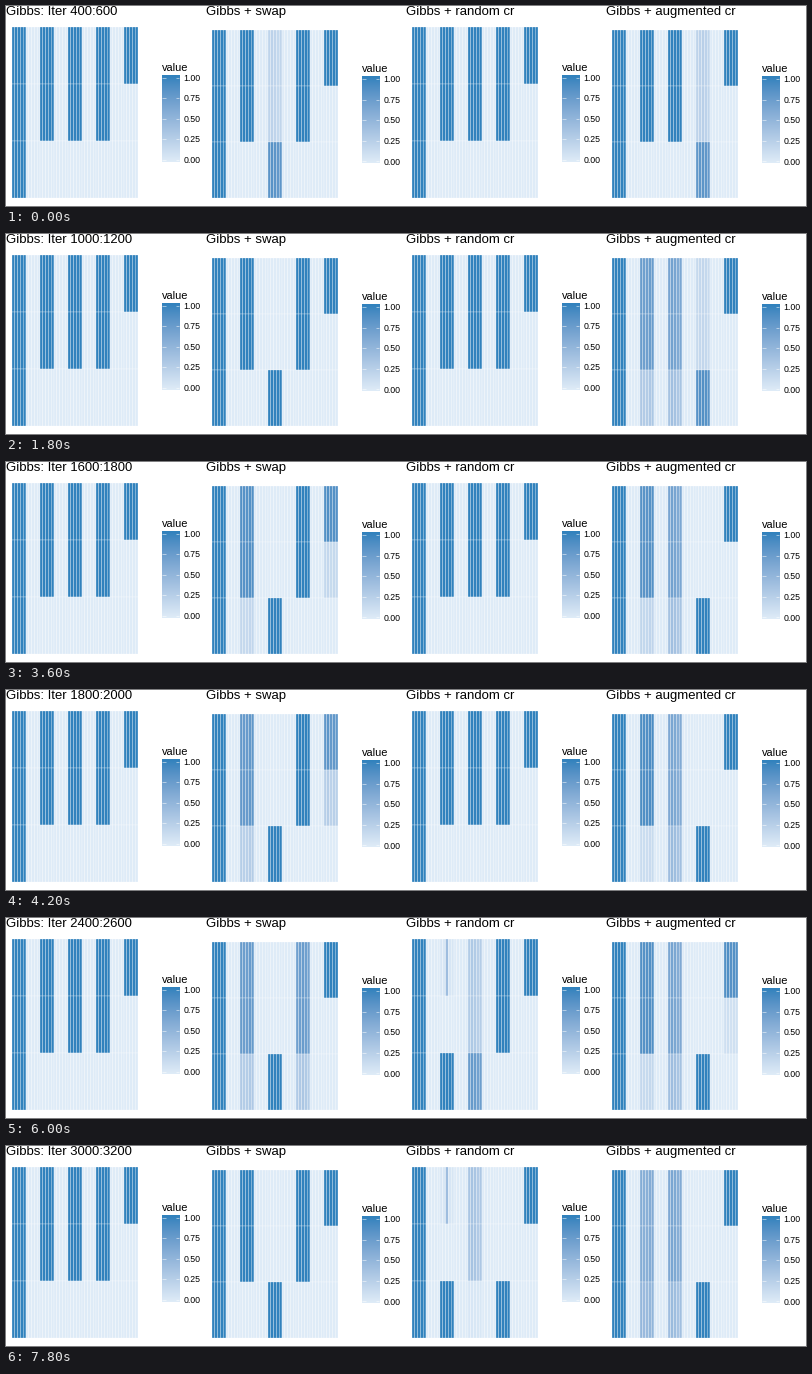
A matplotlib script for the animation above (8000 ms loop, 800 by 200 pixels).

```python
import numpy as np
import matplotlib.pyplot as plt
from matplotlib.animation import FuncAnimation
from matplotlib.colors import ListedColormap

W, H = 800, 200
STEP_FRAMES, FRAMES, INTERVAL = 3, 40, 200
GROUPS, PER_GROUP, ROWS = 9, 5, 3
LEFT, PANEL_W, BOTTOM = 6, 126, 192

plt.rcParams["font.family"] = "Liberation Sans"

# --- colour scale, blended in Lab space ---
TO_XYZ = np.array([[.4124, .3576, .1805], [.2126, .7152, .0722], [.0193, .1192, .9505]])
WHITE = TO_XYZ.sum(axis=1)


def rgb_to_lab(hex_code):
    rgb = np.array([int(hex_code[i:i + 2], 16) for i in (1, 3, 5)]) / 255
    linear = ((rgb + .055) / 1.055) ** 2.4
    x, y, z = np.cbrt(TO_XYZ @ linear / WHITE)
    return np.array([116 * y - 16, 500 * (x - y), 200 * (y - z)])


def lab_to_rgb(lab):
    y = (lab[0] + 16) / 116
    xyz = np.array([y + lab[1] / 500, y, y - lab[2] / 200]) ** 3 * WHITE
    linear = np.clip(np.linalg.solve(TO_XYZ, xyz), 0, 1)
    return np.clip(1.055 * linear ** (1 / 2.4) - .055, 0, 1)


LOW, HIGH = rgb_to_lab("#DEEBF7"), rgb_to_lab("#3182BD")
BLUES = ListedColormap([lab_to_rgb(LOW + t * (HIGH - LOW)) for t in np.linspace(0, 1, 256)])

# --- block values: step -> {group: (top, middle, bottom)} ---
BASE = {0: (1, 1, 1), 2: (1, 1, 0), 4: (1, 1, 0), 6: (1, 1, 0), 8: (1, 0, 0)}


def split(p):
    """Block that is in the upper rows for a share p of the draws."""
    return (p, p, 1 - p)


SETTLED = {4: split(0)}
SWAP = {
    0: {4: split(.2)},
    1: SETTLED,
    4: SETTLED,
    7: {2: split(.75), 4: split(0), 8: (.78, .25, 0)},
    10: {2: split(.72), 4: split(0), 6: split(.7)},
    12: {2: split(.83), 4: split(0), 6: split(.84), 8: (.83, .2, 0)},
    13: SETTLED,
}
RANDOM = {
    0: {},
    7: {},
    10: {2: (.04, 0, 1), 4: split(.28)},
    12: {2: (.04, 0, 1), 4: split(.25), 6: split(.55)},
    13: {2: (.04, 0, 1), 4: (.33, .33, .04), 6: split(0)},
}
AUGMENTED = {
    0: {6: split(.22)},
    1: {2: split(.68), 4: split(.48), 6: split(.5)},
    4: {2: split(.72), 4: split(.72), 6: split(0)},
    7: {2: split(.87), 4: split(.6), 6: split(0)},
    10: {2: split(.84), 4: split(.62), 6: split(0), 8: (.85, .1, 0)},
    12: {2: split(.6), 4: split(.84), 6: split(0)},
    13: {2: split(.55), 4: split(.6), 6: split(0)},
}

RIPPLE = np.random.default_rng(4).uniform(-.05, .05, GROUPS * PER_GROUP)


def tiles(blocks, step):
    steps = sorted(blocks)
    grid = np.zeros((ROWS, GROUPS))
    for g, default in BASE.items():
        keys = np.array([blocks[s].get(g, default) for s in steps])
        for row in range(ROWS):
            grid[row, g] = np.interp(step, steps, keys[:, row])
    grid = np.repeat(grid, PER_GROUP, axis=1)
    grid += RIPPLE * 4 * grid * (1 - grid)
    if blocks is RANDOM and step >= 10:
        grid[0, 2 * PER_GROUP + 2] = .42
    return grid


# --- stage ---
fig = plt.figure(figsize=(W / 72, H / 72), dpi=72, facecolor="white")
ax = fig.add_axes([0, 0, 1, 1])


def draw_legend(x, y):
    ax.text(x, y - 4.5, "value", size=11)
    ramp = np.linspace(1, 0, 87)[:, None]
    ax.imshow(ramp, cmap=BLUES, vmin=0, vmax=1, aspect="auto",
              extent=(x, x + 17.3, y + 86.4, y), interpolation="bilinear")
    for i in range(5):
        ty = y + 2.16 + i * 82.08 / 4
        ax.plot([x, x + 3.5], [ty, ty], color="white", lw=.5, solid_capstyle="butt")
        ax.plot([x + 13.8, x + 17.3], [ty, ty], color="white", lw=.5, solid_capstyle="butt")
        ax.text(x + 21.3, ty + 3.3, f"{1 - i / 4:.2f}", size=8.8)


def add_panel(index, title, blocks, top, legend_y):
    x0 = 200 * index
    label = ax.text(x0, 9.3, title, size=13.1)
    xs = x0 + LEFT + np.linspace(0, PANEL_W, GROUPS * PER_GROUP + 1)
    ys = np.linspace(top, BOTTOM, ROWS + 1)
    mesh = ax.pcolormesh(xs, ys, tiles(blocks, 0), cmap=BLUES, vmin=0, vmax=1,
                         edgecolors="white", linewidth=.25, antialiased=True, snap=False)
    draw_legend(x0 + 156, legend_y)
    return label, mesh, blocks


panels = [
    add_panel(0, "", {0: {}}, 21, 69.4),
    add_panel(1, "Gibbs + swap", SWAP, 24, 71),
    add_panel(2, "Gibbs + random cr", RANDOM, 21, 69.4),
    add_panel(3, "Gibbs + augmented cr", AUGMENTED, 24, 71),
]
ax.set(xlim=(0, W), ylim=(H, 0), aspect="auto")
ax.axis("off")


def update(frame):
    step = frame // STEP_FRAMES
    start = 400 + 200 * step
    panels[0][0].set_text(f"Gibbs: Iter {start}:{start + 200}")
    for _, mesh, blocks in panels:
        mesh.set_array(tiles(blocks, step))
    return []


anim = FuncAnimation(fig, update, frames=FRAMES, interval=INTERVAL,
                     init_func=lambda: update(0) or [], repeat=True, repeat_delay=0)
plt.show()
```
